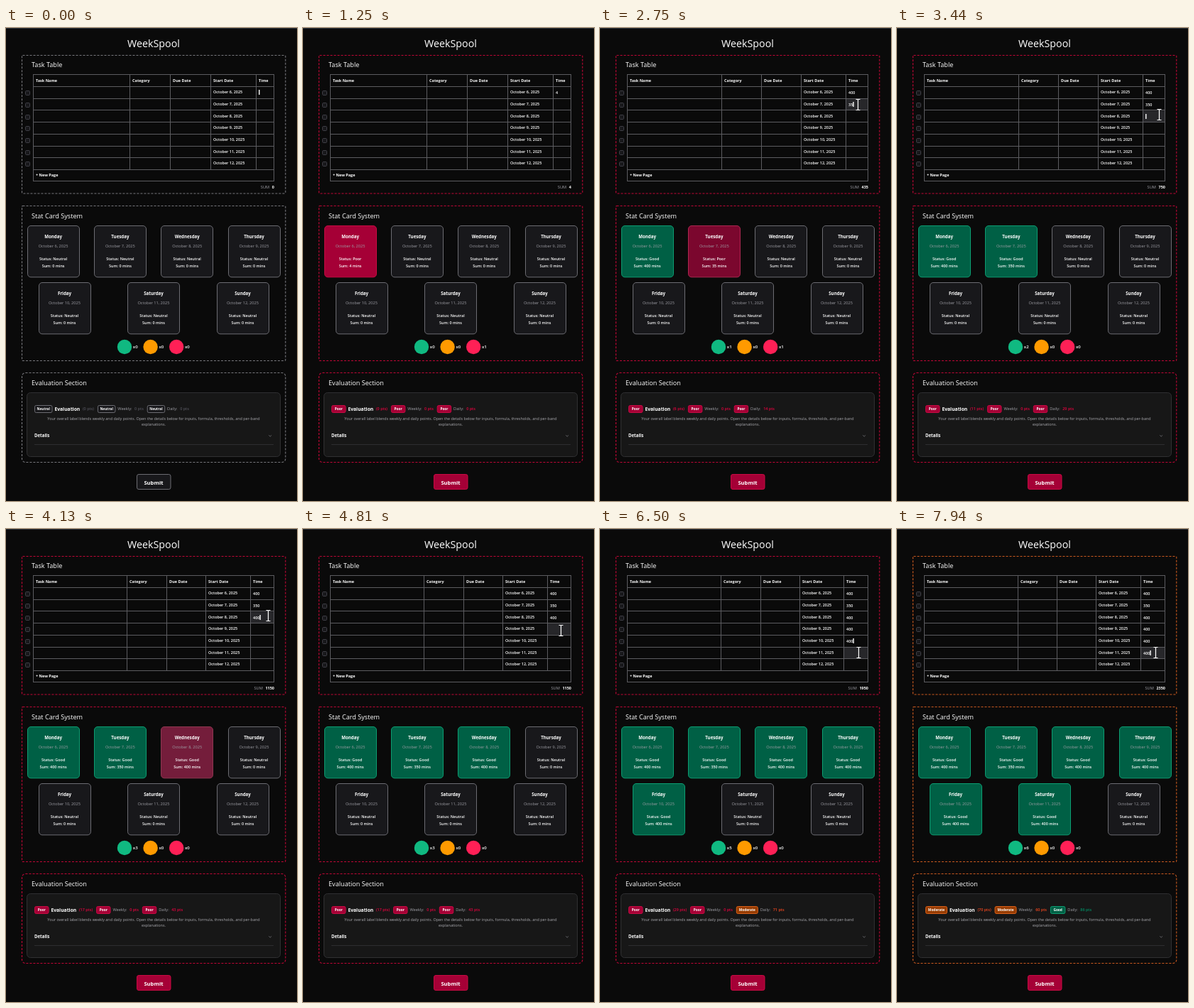
An HTML page that plays this animation: 410 by 666 pixels, repeating every 8000 ms.

```html
<!DOCTYPE html>
<html lang="en">
<head>
<meta charset="utf-8">
<title>WeekSpool</title>
<style>
  html, body { margin: 0; width: 100%; height: 100%; overflow: hidden; background: #0a0a0a; }
  svg { display: block; width: 410px; height: 666px; font-family: "Open Sans", "Noto Sans", sans-serif; }
  text { fill: #fff; font-size: 5.65px; white-space: pre; }
  .title { font-size: 14.3px; }
  .head { font-size: 9.15px; font-weight: 500; }
  .th { font-size: 5.5px; font-weight: 700; }
  .cell { font-size: 5.45px; font-weight: 600; }
  .mid { text-anchor: middle; }
  .end { text-anchor: end; }
  .day { font-size: 6.15px; font-weight: 700; }
  .stat { font-size: 5.45px; font-weight: 600; }
  .date { fill: #9d9da4; font-weight: 500; }
  .dim { fill: #a1a1a8; font-weight: 500; }
  .para { fill: #ababb0; font-size: 5.45px; }
  .eval { font-size: 6.75px; font-weight: 700; }
  .points { font-size: 5.45px; font-weight: 600; }
  .badge { font-size: 4.8px; font-weight: 700; }
  .tally { font-size: 6.1px; font-weight: 600; }
  .details { font-size: 6.1px; font-weight: 700; }
  .submit { font-size: 7.65px; font-weight: 700; }
  .grid { stroke: #5c5c60; fill: none; }
  .panel { fill: none; stroke-dasharray: 3 2; stroke-width: 1.1; }
</style>
</head>
<body>
<svg id="stage" viewBox="0 0 410 666"></svg>
<script>
const LOOP = 8000, ROW = 16.7, TOP = 82.5;
const stage = document.getElementById('stage');

function el(tag, attrs, text) {
  const node = document.createElementNS('http://www.w3.org/2000/svg', tag);
  set(node, attrs);
  if (text !== undefined) node.textContent = text;
  return stage.appendChild(node);
}
function set(node, attrs) {
  for (const k in attrs) node.setAttribute(k, attrs[k]);
}
const label = (x, y, cls, text = '') => el('text', { x, y, class: cls }, text);
const box = (x, y, width, height, rx, attrs) => el('rect', { x, y, width, height, rx, ...attrs });
const line = (x1, y1, x2, y2) => el('line', { x1, y1, x2, y2, class: 'grid' });
const put = (node, text) => { if (node.textContent !== text) node.textContent = text; };

const LOOKS = {
  Neutral:  { card: '#18181b', edge: '#6c6c72', panel: '#77777c', button: '#18181b', points: '#52525b', w: 25 },
  Poor:     { card: '#a50036', edge: '#c70b43', panel: '#c00636', button: '#a50036', points: '#e6033f', w: 20 },
  Moderate: { card: '#973c00', edge: '#d9601a', panel: '#c9591f', button: '#973c00', points: '#f5481f', w: 30.5 },
  Good:     { card: '#006045', edge: '#0d9d72', panel: '#009966', button: '#006045', points: '#008f66', w: 21 }
};

// When each time cell gets focus, and when its digits are typed
const ENTRIES = [
  { focus: 0,    keys: [690, 1380, 1500],  text: '400' },
  { focus: 2200, keys: [2600, 2720, 2840], text: '350' },
  { focus: 3350, keys: [3800, 3950, 4080], text: '400' },
  { focus: 4850, keys: [5130, 5230, 5330], text: '400' },
  { focus: 5750, keys: [5900, 6000, 6090], text: '400' },
  { focus: 6600, keys: [7050, 7250, 7630], text: '400' }
];
// Pointer moves: start, end, x, y
const MOVES = [
  [1990, 2000, 362.5, 93], [2000, 2150, 363.5, 108], [3050, 3300, 369.5, 122],
  [4400, 4700, 363.5, 143], [5500, 5700, 364.5, 158], [6250, 6450, 364.5, 174]
];

const rate = p => p < 60 ? 'Poor' : p < 80 ? 'Moderate' : 'Good';

function stateAt(t) {
  const typed = ENTRIES.map(e => e.text.slice(0, e.keys.filter(k => k <= t).length)).concat('');
  const mins = typed.map(Number);
  const sum = mins.reduce((a, b) => a + b, 0);
  const status = mins.map(m => !m ? 'Neutral' : m < 100 ? 'Poor' : m < 250 ? 'Moderate' : 'Good');
  const count = name => status.filter(s => s === name).length;
  const daily = count('Good') / 7 * 100;
  const weekly = sum > 2100 ? 60 : 0;
  const total = weekly * .6 + daily * .4;
  const grade = p => sum ? rate(p) : 'Neutral';
  return { typed, mins, sum, status, count, daily, weekly, total,
           overall: grade(total), week: grade(weekly), day: grade(daily) };
}

// Mean of the recent colours gives a linear fade
function fade(states, pick) {
  const acc = [0, 0, 0];
  for (const s of states) {
    const n = parseInt(pick(s).slice(1), 16);
    acc[0] += n >> 16; acc[1] += n >> 8 & 255; acc[2] += n & 255;
  }
  return `rgb(${acc.map(v => Math.round(v / states.length))})`;
}
const recent = (t, span) => Array.from({ length: 10 }, (_, i) => stateAt(t - i * span / 10));

// Static parts
box(0, 0, 410, 1, 0, { fill: '#2a3038' });
label(208, 27, 'title mid', 'WeekSpool');
const panels = [[38.5, 194.5, 1], [250.5, 218, 1], [485.5, 126, 5]]
  .map(([y, h, r]) => box(22.5, y, 371.3, h, r, { class: 'panel' }));
label(36, 55, 'head', 'Task Table');
label(36, 268, 'head', 'Stat Card System');
label(36, 503, 'head', 'Evaluation Section');

// Table
const hover = box(0, 0, 0, ROW - 1, 0, { fill: '#27272a' });
box(38.5, 65.5, 339, 150, 0, { class: 'grid' });
for (let i = 0; i < 8; i++) {
  const y = Math.round(TOP + i * ROW - .5) + .5;
  line(38.5, y, 377.5, y);
}
label(42, 76, 'th', 'Task Name');
// Column edge, and how far it follows the widening last column
const cols = [['Category', 174.5, .45], ['Due Date', 231.5, .62], ['Start Date', 288.5, .85], ['Time', 352.5, 1]]
  .map(([name, x, pull]) => ({ x, pull, rule: line(x, 65.5, x, 199), head: label(x, 76, 'th', name) }));
const rows = Array.from({ length: 7 }, (_, i) => {
  const y = Math.round(92.1 + i * ROW);
  box(27.5, y - 3.5, 6, 6, 1.2, { fill: '#18181b', stroke: '#3f3f46' });
  return { y, date: label(0, y, 'cell', `October ${6 + i}, 2025`), time: label(0, y + 1, 'cell') };
});
label(42, 209, 'th', '+ New Page');
const sumLabel = label(0, 226, 'dim end', 'SUM');
const sumValue = label(378, 226, 'th end');

// Cards
const days = ['Monday', 'Tuesday', 'Wednesday', 'Thursday', 'Friday', 'Saturday', 'Sunday'];
const cards = days.map((name, i) => {
  const low = i > 3;
  const cx = low ? 82.5 + (i - 4) * 125.5 : 66.6 + i * 94.3;
  const y = low ? 358.5 : 278.5;
  const rect = box(Math.floor(cx - 36.5) + .5, y, 73, 72.3, 4.5);
  label(cx, y + 17.5, 'day mid', name);
  label(cx, y + 30.5, 'date mid', `October ${6 + i}, 2025`);
  return { rect, status: label(cx, y + 48.5, 'stat mid'), sum: label(cx, y + 58.5, 'stat mid') };
});
const tallies = [['Good', '#10b981'], ['Moderate', '#ff9a00'], ['Poor', '#ff2056']]
  .map(([name, fill], i) => {
    const cx = 167 + i * 36.6;
    el('circle', { cx, cy: 449, r: 10.2, fill });
    return { name, text: label(cx + 11.8, 451, 'tally') };
  });

// Evaluation
box(29.5, 513.5, 357, 90, 5, { fill: '#171717', stroke: '#303032' });
const groups = [['Evaluation', 'eval', 539], ['Weekly:', 'dim', 538], ['Daily:', 'dim', 538]]
  .map(([name, cls, y]) => ({
    rect: box(0, 531.5, 0, 10, 2),
    badge: label(0, 538.3, 'badge mid'),
    name: label(0, y, cls, name),
    points: label(0, 538, 'points')
  }));
label(208, 552, 'para mid', 'Your overall label blends weekly and daily points. Open the details below for inputs, formula, thresholds, and per-band');
label(208, 560, 'para mid', 'explanations.');
label(40, 576, 'details', 'Details');
el('path', { d: 'M370.3 573.3l1.9 1.9 1.9-1.9', fill: 'none', stroke: '#77777c', 'stroke-width': .8 });
box(40, 586, 337, 1, 0, { fill: '#2e2e30' });
const button = box(184.5, 628.5, 47.5, 21, 2.5);
label(208, 642.8, 'submit mid', 'Submit');

const caret = box(0, 0, 1.4, 7, 0, { fill: '#fff' });
const pointer = el('path', {
  d: 'M-3 -7.5H-1Q0 -7.5 0 -6.5Q0 -7.5 1 -7.5H3M0 -6.5V6.5M-3 7.5H-1Q0 7.5 0 6.5Q0 7.5 1 7.5H3',
  fill: 'none', stroke: '#fff', 'stroke-width': 1.2
});

function pointerAt(t) {
  let [, , x, y] = MOVES[0];
  for (const [from, to, nx, ny] of MOVES) {
    const p = Math.min(1, Math.max(0, (t - from) / (to - from)));
    const e = p * p * (3 - 2 * p);
    x += (nx - x) * e;
    y += (ny - y) * e;
  }
  return { x, y };
}

function drawTable(s, t) {
  const digits = String(s.sum).length;
  const grow = digits < 4 ? (digits - 1) * 3 : 8 + Math.max(0, s.sum - 1150) / 1200;
  const edges = cols.map(c => Math.floor(c.x - c.pull * grow) + .5);
  cols.forEach((c, i) => {
    set(c.rule, { x1: edges[i], x2: edges[i] });
    set(c.head, { x: edges[i] + 3.6 });
  });
  rows.forEach((r, i) => {
    set(r.date, { x: edges[2] + 3.6 });
    set(r.time, { x: edges[3] + 3.6 });
    put(r.time, s.typed[i]);
  });
  put(sumValue, String(s.sum));
  set(sumLabel, { x: 374.3 - sumValue.getComputedTextLength() });

  const active = ENTRIES.filter(e => e.focus <= t).length - 1;
  const entry = ENTRIES[active];
  const since = t - Math.max(entry.focus, ...entry.keys.filter(k => k <= t));
  const width = s.typed[active] ? rows[active].time.getComputedTextLength() : 0;
  set(caret, {
    x: edges[3] + 3.6 + width, y: rows[active].y - 5,
    visibility: since % 1000 < 500 ? 'visible' : 'hidden'
  });

  const { x, y } = pointerAt(t);
  const visibility = t >= MOVES[0][1] ? 'visible' : 'hidden';
  const over = Math.floor((y - TOP) / ROW);
  set(pointer, { transform: `translate(${x} ${y})`, visibility });
  set(hover, { x: edges[3] + .5, y: TOP + over * ROW + .5, width: 377 - edges[3] - .5, visibility });
}

function drawScores(s, past) {
  const scores = [['overall', s.total], ['week', s.weekly], ['day', s.daily]];
  let x = 40.5;
  groups.forEach((g, i) => {
    const [key, value] = scores[i];
    const w = LOOKS[s[key]].w - .5;
    const pts = Math.round(value) + ' pts';
    set(g.rect, {
      x, width: w,
      fill: fade(past, p => LOOKS[p[key]].card),
      stroke: fade(past, p => LOOKS[p[key]].edge)
    });
    set(g.badge, { x: x + w / 2 });
    put(g.badge, s[key]);
    x += w + 3.4;
    set(g.name, { x });
    x += g.name.getComputedTextLength() + 3.6;
    put(g.points, i ? pts : `(${pts})`);
    set(g.points, { x, style: 'fill:' + fade(past, p => LOOKS[p[key]].points) });
    x += g.points.getComputedTextLength() + 5.4;
  });
}

function draw(t) {
  const s = stateAt(t), past = recent(t, 250), late = recent(t - 320, 200);
  drawTable(s, t);
  drawScores(s, past);
  const stroke = fade(past, p => LOOKS[p.overall].panel);
  panels.forEach(p => set(p, { stroke }));
  cards.forEach((c, i) => {
    set(c.rect, {
      fill: fade(past, p => LOOKS[p.status[i]].card),
      stroke: fade(past, p => LOOKS[p.status[i]].edge)
    });
    put(c.status, 'Status: ' + s.status[i]);
    put(c.sum, `Sum: ${s.mins[i]} mins`);
  });
  tallies.forEach(c => put(c.text, 'x' + s.count(c.name)));
  set(button, {
    fill: fade(late, p => LOOKS[p.overall].button),
    stroke: fade(late, p => LOOKS[p.overall].edge)
  });
}

const start = performance.now();
function tick() {
  draw((performance.now() - start) % LOOP);
  requestAnimationFrame(tick);
}
tick();
</script>
</body>
</html>
```
